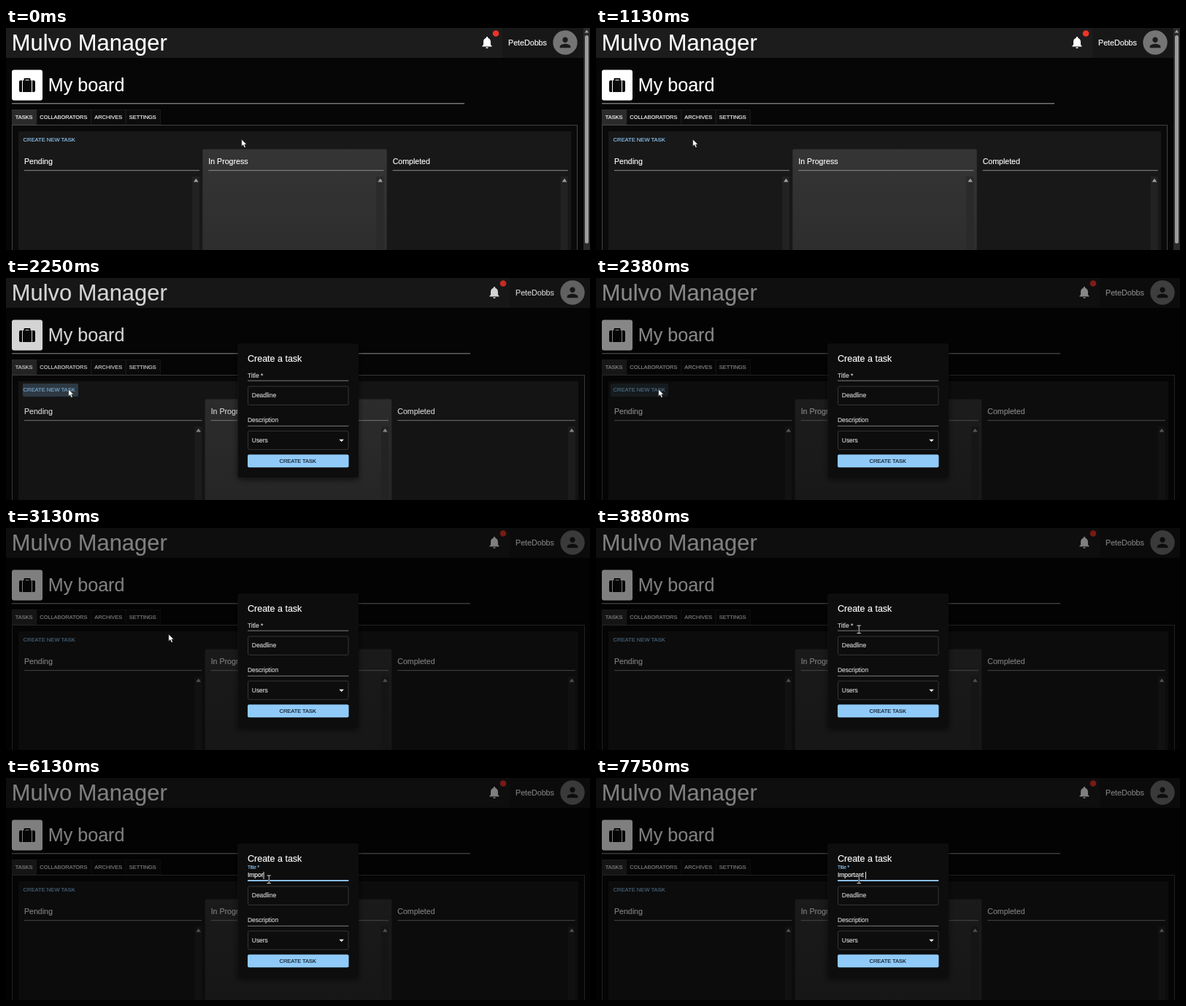
Write an HTML page that moves like this. It is 800 px wide and 305 px high and loops after 8000 ms.

```html
<!DOCTYPE html>
<html lang="en">
<head>
<meta charset="utf-8">
<title>Task board</title>
<style>
  html, body { margin: 0; width: 100%; height: 100%; overflow: hidden; background: #060606; }
  svg { display: block; width: 100%; height: 100%; }
  text { font-family: "Liberation Sans", Arial, sans-serif; white-space: pre; }
</style>
</head>
<body>
<svg id="stage" viewBox="0 0 800 305"></svg>
<script>
const LOOP = 8000, STEP = 125;
const WIDE = 801, NARROW = 791;   // page width without and with its scrollbar
const BLUE = '#90caf9';
const stage = document.getElementById('stage');

const rect = (x, y, w, h, fill, more = '') =>
  `<rect x="${x}" y="${y}" width="${w}" height="${h}" fill="${fill}" ${more}/>`;
const line = (x1, x2, y, color, width = 1) => rect(x1, y, x2 - x1, width, color);
// A hairline stroke gives small type its hinted weight.
const text = (x, y, size, str, fill = '#fff', more = '') =>
  `<text x="${x}" y="${y}" font-size="${size}" fill="${fill}" stroke="${fill}" stroke-width=".15" ${more}>${str}</text>`;
const path = (d, fill, more = '') => `<path d="${d}" fill="${fill}" ${more}/>`;

function header(w) {
  const bell = 'M12 22c1.1 0 2-.9 2-2h-4c0 1.1.89 2 2 2zm6-6v-5c0-3.07-1.64-5.64-4.5-6.32V4c0-.83-.67-1.5-1.5-1.5s-1.5.67-1.5 1.5v.68C7.63 5.36 6 7.92 6 11v5l-2 2v1h16v-1l-2-2z';
  const person = 'M12 12c2.21 0 4-1.79 4-4s-1.79-4-4-4-4 1.79-4 4 1.79 4 4 4zm0 2c-2.67 0-8 1.34-8 4v2h16v-2c0-2.66-5.33-4-8-4z';
  return rect(0, 0, w, 41, '#1c1c1c')
    + rect(w - 111, 0, 111, 41, '#171717')
    + text(7.8, 31, 30.9, 'Mulvo Manager')
    + path(bell, '#fff', `transform="translate(${w - 142} 9.8) scale(.83)"`)
    + `<circle cx="${w - 120}" cy="7.5" r="4.3" fill="#ee3428"/>`
    + text(w - 103, 24, 10.7, 'PeteDobbs')
    + `<circle cx="${w - 25}" cy="20" r="16.7" fill="#757575"/>`
    + path(person, '#1b1b1b', `transform="translate(${w - 36} 8.9) scale(.92)"`);
}

function title(w) {
  return rect(8, 57.5, 42, 42, '#fff', 'rx="3"')
    + rect(18, 72, 22, 16, '#0a0a0a', 'rx="2"')
    + '<path d="M25.5 72.5v-2.5h7v2.5" fill="none" stroke="#0a0a0a" stroke-width="2" stroke-linejoin="round"/>'
    + rect(22, 72, 1, 16, '#fff') + rect(35, 72, 1, 16, '#fff')
    + text(57.8, 87, 25.1, 'My board')
    + line(8, 8 + .8 * (w - 16), 103.3, '#a8a8a8');
}

function tabs() {
  const items = [['TASKS', 8, 41], ['COLLABORATORS', 41.5, 116], ['ARCHIVES', 116.5, 163.5], ['SETTINGS', 164, 211]];
  return items.map(([name, a, b], i) =>
    rect(a + .5, 112.5, b - a, 20.5, i ? '#0c0c0c' : '#2b2b2b', `stroke="${i ? '#1e1e1e' : '#3a3a3a'}" stroke-width=".8"`)
    + text(a + 4.8, 125.2, 7.4, name)).join('');
}

function board(w) {
  const col = (w - 34) / 3;
  const columns = ['Pending', 'In Progress', 'Completed'].map((name, i) => {
    const x = 17 + col * i, end = x + col - 4.3, mid = end - 4.7;
    return (i === 1 ? rect(x, 166.5, col, 145, 'url(#active)', 'rx="2"') : '')
      + text(x + 8, 187, 10.6, name)
      + line(x + 8, end, 195.2, '#8c8c8c')
      + rect(end - 10, 204, 10, 101, i === 1 ? '#2a2a2a' : '#222')
      + path(`M${mid - 3.3} 211.5h6.6l-3.3-4.8z`, '#a0a0a0');
  }).join('');
  return rect(8.5, 133.5, w - 17, 180, '#0a0a0a', 'stroke="#424242"')
    + rect(17, 142, w - 34, 170, '#181818')
    + columns
    + text(23.5, 156.4, 7.6, 'CREATE NEW TASK', BLUE);
}

const scrollbar = () => rect(791, 0, 9, 305, '#2a2a2a')
  + path('M792.7 6.5h5.6l-2.8-4z', '#a0a0a0')
  + rect(793, 10, 5, 286, '#9d9d9d', 'rx="2.5"');

const page = w => rect(0, 0, 800, 305, '#060606') + header(w) + title(w) + tabs() + board(w)
  + (w === NARROW ? scrollbar() : '');

function dialog() {
  const field = y => rect(331.5, y, 137.5, 25.5, 'none', 'rx="2" stroke="#363636"');
  return rect(317.5, 90, 165.5, 184, '#0e0e0e', 'rx="2" filter="url(#shadow)"')
    + text(331, 115.4, 12.5, 'Create a task')
    + line(331, 469.3, 140.6, '#7c7c7c')
    + text(331, 136.8, 8.45, 'Title *', '#d0d0d0', 'id="label"')
    + rect(331, 140, 138.3, 1.8, BLUE, 'id="focus"')
    + text(331, 136, 8.45, '', '#fff', 'id="typed"')
    + rect(331, 128.8, .9, 10, '#fff', 'id="caret"')
    + field(148.9) + text(336.8, 164.2, 8.45, 'Deadline', '#d0d0d0')
    + text(331, 198.2, 8.45, 'Description', '#d0d0d0')
    + line(331, 469.3, 202.8, '#7c7c7c')
    + field(210.2) + text(336.8, 225.8, 8.45, 'Users', '#d0d0d0')
    + path('M456.3 221.7h6.6l-3.3 3.4z', '#fff')
    + rect(331, 242.5, 138.5, 17.7, BLUE, 'rx="2"')
    + text(399.8, 254.1, 7.45, 'CREATE TASK', '#0b1722', 'text-anchor="middle"');
}

stage.innerHTML = `<defs>
  <linearGradient id="active" x2="0" y2="1"><stop stop-color="#353535"/><stop offset="1" stop-color="#2d2d2d"/></linearGradient>
  <filter id="shadow" x="-20%" y="-20%" width="140%" height="140%">
    <feDropShadow dx="0" dy="3" stdDeviation="4" flood-color="#000" flood-opacity=".6"/></filter>
  <clipPath id="clip"><rect x="20" y="145" width="79" height="18" rx="2"/></clipPath>
</defs>
<g id="narrow">${page(NARROW)}</g>
<g id="wide">${page(WIDE)}</g>
<g clip-path="url(#clip)"><circle id="ripple" cx="86" cy="153" fill="${BLUE}"/></g>
<rect id="dim" width="800" height="305"/>
<g id="dialog">${dialog()}</g>
<path id="arrow" d="M0 0v9.6l2.2-2 1.6 3.6 1.9-.8-1.6-3.5h3z" fill="#fff" stroke="#111" stroke-width=".6"/>
<g id="beam" fill="none"><path d="M357.5 134h5.4M357.5 144.6h5.4M360.2 134v10.6" stroke="#000" stroke-width="2"/>
<path d="M357.5 134h5.4M357.5 144.6h5.4M360.2 134v10.6" stroke="#d8d8d8"/></g>`;

const el = {};
stage.querySelectorAll('[id]').forEach(n => el[n.id] = n);

const clamp = v => Math.min(1, Math.max(0, v));
const span = (t, a, b) => clamp((t - a) / (b - a));
const smooth = p => p * p * (3 - 2 * p);
const mix = (a, b, p) => a + (b - a) * p;
const show = (node, on) => node.setAttribute('display', on ? 'inline' : 'none');
const set = (node, attrs) => { for (const k in attrs) node.setAttribute(k, attrs[k]); };
// Latest value whose start time has passed.
const at = (t, keys) => keys.reduce((v, [start, next]) => t >= start ? next : v, keys[0][1]);

const TYPING = [[0, ''], [5375, 'I'], [5750, 'Impo'], [6125, 'Impor'], [6500, 'Import'],
  [6625, 'Importa'], [6750, 'Importan'], [6875, 'Important'], [7500, 'Important ']];
const DIM = [[0, 0], [2250, .17], [2375, .47], [2500, .5]];
const RIPPLE = [[0, 0], [1875, .25], [2375, .14], [2500, .05], [2625, 0]];
const FOCUS = 4500;

function draw(time) {
  const t = Math.floor(time / STEP) * STEP;
  const open = t >= 2250;
  show(el.narrow, !open);
  show(el.wide, open);
  show(el.dialog, open);
  set(el.dim, { opacity: at(t, DIM) });

  const grow = span(t, 1800, 2450);
  set(el.ripple, { r: 70 * grow * (2 - grow), opacity: at(t, RIPPLE) });

  const there = smooth(span(t, 500, 1375)), back = smooth(span(t, 2750, 3500));
  const x = mix(mix(322.7, 85.6, there), 360, back);
  const y = mix(153, 139, back);
  set(el.arrow, { transform: `translate(${x} ${y})` });
  show(el.arrow, back < 1);
  show(el.beam, back === 1);

  const focus = smooth(span(t, FOCUS - 75, FOCUS + 125));
  const tint = focus ? BLUE : '#d0d0d0';
  set(el.label, {
    y: mix(136.8, 125.4, focus),
    'font-size': mix(8.45, 6.35, focus),
    fill: tint, stroke: tint
  });
  set(el.focus, { x: 400.2 - 69.2 * focus, width: 138.3 * focus });

  const typed = at(t, TYPING);
  if (el.typed.textContent !== typed) el.typed.textContent = typed;
  const width = open && typed ? el.typed.getComputedTextLength() : 0;
  set(el.caret, { x: 331 + width });
  show(el.caret, t >= FOCUS && (typed || (t - FOCUS) % 1000 < 500));
}

const begin = performance.now();
function tick() {
  draw((performance.now() - begin) % LOOP);
  requestAnimationFrame(tick);
}
tick();
</script>
</body>
</html>
```
